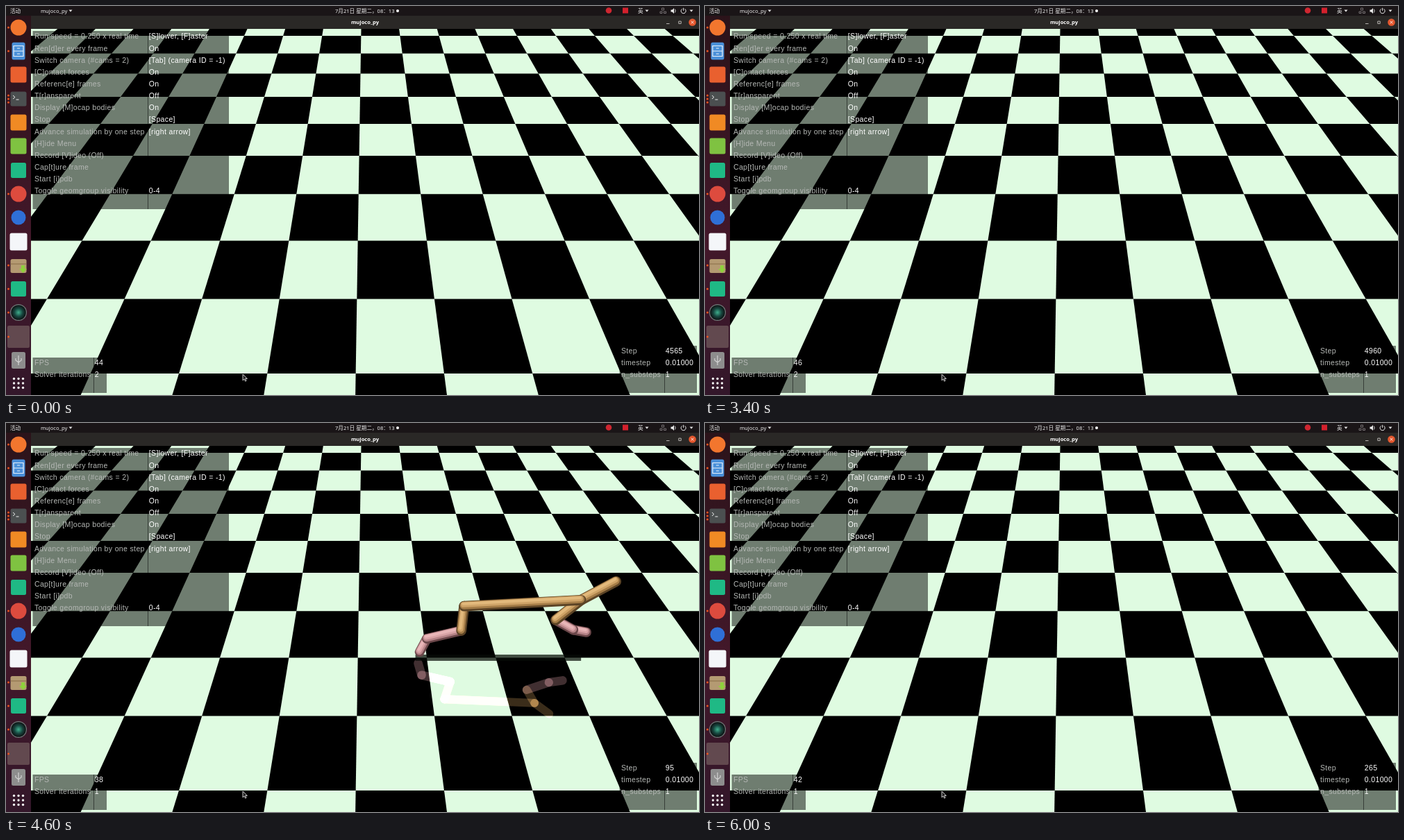
An HTML page with a canvas for the animation above (6070 ms loop, 998 by 561 pixels).

```html
<!DOCTYPE html>
<html lang="zh">
<head>
<meta charset="utf-8">
<title>mujoco_py</title>
<style>
  html, body { margin: 0; width: 100%; height: 100%; overflow: hidden; background: #000; }
  canvas, svg { position: absolute; left: 0; top: 0; width: 998px; height: 561px; }
  .hud { font: 10.5px "Liberation Sans", Arial, sans-serif; letter-spacing: .35px; fill: #fff; }
  .hud .label { fill: #b5b8b5; }
  .bar { font: 7.6px "Noto Sans", "Noto Sans CJK SC", sans-serif; fill: #ececec; }
</style>
</head>
<body>
<canvas id="scene" width="998" height="561"></canvas>
<svg id="ui" viewBox="0 0 998 561">
  <defs>
    <linearGradient id="dock" x2="0" y2="1">
      <stop offset="0" stop-color="#2a1319"/><stop offset=".6" stop-color="#43182a"/><stop offset="1" stop-color="#33172a"/>
    </linearGradient>
    <radialGradient id="lens">
      <stop offset="0" stop-color="#3fae8c"/><stop offset=".55" stop-color="#17463f"/><stop offset="1" stop-color="#0c1212"/>
    </radialGradient>
  </defs>

  <g id="hud" class="hud"></g>

  <path d="M341 531v9l2.1-1.9 1.5 3.1 1.5-.7-1.5-3h2.8z" fill="#222" stroke="#d8d8d8" stroke-width=".9"/>

  <rect width="36" height="561" fill="url(#dock)"/>
  <rect width="998" height="14" fill="#1a1517"/>
  <rect x="36" y="14" width="962" height="19" fill="#2a2826"/>
  <g class="bar">
    <text x="6" y="10">活动</text>
    <text x="50" y="10">mujoco_py</text>
    <text x="474" y="10" textLength="">7月21日 星期二，08：13</text>
    <text x="910" y="10">英</text>
    <text x="517" y="26.3" text-anchor="middle" font-weight="700" fill="#fff">mujoco_py</text>
  </g>
  <path d="M90.500 5.500h5l-2.500 3zM920.500 5.500h5l-2.500 3zM984.500 5.500h5l-2.500 3z" fill="#e4e4e4"/>
  <circle cx="564" cy="7" r="2" fill="#fff"/>
  <circle cx="868" cy="6.500" r="4.300" fill="#cf2630"/>
  <rect x="888" y="2.500" width="8" height="8" fill="#d3202c"/>
  <path d="M944.500 3h3v3h-3zM942 8h3v2.500h-3zM947.500 8h3v2.500h-3z" fill="none" stroke="#8c8688" stroke-width=".8"/>
  <path d="M957.500 5.500h2l2.500-2.500v8l-2.500-2.500h-2z" fill="#eee"/>
  <path d="M963.300 4.500q1.800 2.500 0 5" fill="none" stroke="#ccc"/>
  <path d="M973.700 4.200a3.500 3.500 0 1 0 3.800 0M975.600 2.800v4" fill="none" stroke="#eee"/>
  <path d="M951 25.500h4.500M968.800 22h3.400v3.400h-3.400z" fill="none" stroke="#c9c6c2" stroke-width=".9"/>
  <circle cx="988.500" cy="23.500" r="5.300" fill="#e4572e"/>
  <path d="M986.700 21.700l3.600 3.600m0-3.600l-3.600 3.600" stroke="#fff" stroke-width=".9"/>
  <g id="icons"></g>
</svg>

<script>
const LOOP = 6070, W = 998, H = 561;
const ctx = document.getElementById('scene').getContext('2d');
const hud = document.getElementById('hud');
const icons = document.getElementById('icons');

function add(parent, tag, attrs, text) {
  const el = document.createElementNS('http://www.w3.org/2000/svg', tag);
  for (const k in attrs) el.setAttribute(k, attrs[k]);
  if (text !== undefined) el.textContent = text;
  parent.append(el);
  return el;
}

/* ---- overlay panels ---- */
function panel(x, y, w, h, split, baseline, rows) {
  for (const [px, pw] of [[x, split - x + .5], [split - .5, x + w - split + .5]])
    add(hud, 'rect', { x: px, y, width: pw, height: h, fill: '#000', opacity: .5 });
  return rows.map(([label, value], i) => {
    const ty = baseline + i * 17.15;
    add(hud, 'text', { x: x + 2.5, y: ty, class: 'label' }, label);
    return add(hud, 'text', { x: split + 1.3, y: ty }, value);
  });
}

panel(38.5, 36, 282.5, 257, 204.5, 47.4, [
  ['Run speed = 0.250 x real time', '[S]lower, [F]aster'],
  ['Ren[d]er every frame', 'On'],
  ['Switch camera (#cams = 2)', '[Tab] (camera ID = -1)'],
  ['[C]ontact forces', 'On'],
  ['Referenc[e] frames', 'On'],
  ['T[r]ansparent', 'Off'],
  ['Display [M]ocap bodies', 'On'],
  ['Stop', '[Space]'],
  ['Advance simulation by one step', '[right arrow]'],
  ['[H]ide Menu', ''],
  ['Record [V]ideo (Off)', ''],
  ['Cap[t]ure frame', ''],
  ['Start [i]pdb', ''],
  ['Toggle geomgroup visibility', '0-4']
]);
const [fpsText, solverText] = panel(38.5, 507, 106.5, 51, 126.5, 518,
  [['FPS', ''], ['Solver iterations', '']]);
const [stepText] = panel(883.5, 490, 111.5, 68, 948.5, 500.8,
  [['Step', ''], ['timestep', '0.01000'], ['n_substeps', '1']]);

/* ---- dock ---- */
const disc = (y, fill, r = 11.5) => add(icons, 'circle', { cx: 18, cy: y, r, fill });
const tile = (y, fill, w = 23, h = 23) =>
  add(icons, 'rect', { x: 18 - w / 2, y: y - h / 2, width: w, height: h, rx: 2.5, fill });
const line = (d, stroke, width = 1.2) =>
  add(icons, 'path', { d, stroke, 'stroke-width': width, fill: 'none' });

disc(31, '#f2762e');
tile(65, '#4a90d9', 19, 25);
line('M11 57.500h14v15h-14zM11 65h14M16 61h4M16 69h4', '#e8f1fa');
tile(99, '#e9602f');
tile(134, '#4b4f50', 23, 21);
line('M10 129l3 2.500-3 2.500M14.500 135h4', '#eee', 1);
tile(168, '#f08a24');
tile(202, '#7fc241');
tile(237, '#1fb985', 22, 22);
disc(271, '#dd4b3e');
disc(305, '#2f6fd6', 10.5);
tile(340, '#f4f6f9', 25, 25);
tile(375, '#b49a72', 23, 20);
line('M7 372h22', '#8f764f');
add(icons, 'path', { d: 'M22 374h5v5h3l-5.500 6-5.500-6h3z', fill: '#8fd03c' });
tile(408, '#1fb985', 22, 22);
disc(442, '#747c7c', 12);
disc(442, 'url(#lens)', 10.8);
add(icons, 'rect', { x: 2, y: 461, width: 32, height: 32, rx: 2, fill: '#62494f' });
tile(511, '#8d8d8d', 20, 24);
line('M18 518v-14m-4 4v3l4 3m4-6v3l-4 3', '#d2d2d2');
for (let i = 0; i < 9; i++)
  add(icons, 'circle', { cx: 11.5 + i % 3 * 6.5, cy: 537.5 + (i / 3 | 0) * 6.5, r: 1.7, fill: '#f2f2f2' });
for (const y of [31, 65, 129, 134, 139, 271, 374, 408, 442, 477])
  add(icons, 'circle', { cx: 3.5, cy: y, r: 1.5, fill: '#e95420' });

/* ---- floor: perspective checkerboard ---- */
const HORIZON = -340.8, VANISH = 517.4;
const rowY = n => HORIZON + 6176.6 / (n + 7.093);
const colX = (k, y) => VANISH + (y - HORIZON) * (k * .1462 - .0158);

function drawFloor() {
  ctx.fillStyle = '#000';
  ctx.fillRect(0, 0, W, H);
  ctx.fillStyle = '#dffbe1';
  for (let n = -1; n < 11; n++) {
    const y0 = rowY(n), y1 = rowY(n + 1);
    for (let k = -10; k < 11; k++) {
      if ((k + n) & 1) continue;
      ctx.beginPath();
      ctx.moveTo(colX(k, y0), y0);
      ctx.lineTo(colX(k + 1, y0), y0);
      ctx.lineTo(colX(k + 1, y1), y1);
      ctx.lineTo(colX(k, y1), y1);
      ctx.fill();
    }
  }
}

/* ---- cheetah: planar skeleton above the floor line ---- */
const GROUND = 338.5, CENTER = 515, NADIR = 950;
const project = ([x, u]) => {
  const s = 1 / (1 - u / NADIR);
  return [CENTER + x * s, (GROUND - u) * s, s];
};
const TAN = ['#5c4426', '#a57d48', '#cfa468', '#e2b97c'];
const PINK = ['#6b474a', '#b58387', '#d8a3a6', '#e8b6b8'];

// time, x, height, then angles: torso, back thigh/shin/foot, front thigh/shin/foot
const POSES = [
  [56, -95, 100, 0, -57, 207, -73, -120, -54, -57],
  [60, -78, 74, 3, -78, 168, -112, -111, -39, -18],
  [64.5, 12, 90, -4, -58, 205, -80, -118, -48, -45],
  [69, 129, 103, 4.2, -86, 200, -105, -121, -33, -14],
  [73.5, 310, 88, -3, -60, 190, -85, -112, -45, -30],
  [78, 511, 122, -10, -89, 197, -119, -118, -40, -30],
  [82, 720, 95, -4, -60, 195, -85, -115, -45, -30]
];

// Linear interpolation through rows of [time, ...values].
function track(keys, t) {
  let j = 0;
  while (j < keys.length - 2 && t >= keys[j + 1][0]) j++;
  const a = keys[j], b = keys[j + 1], f = (t - a[0]) / (b[0] - a[0]);
  return a.slice(1).map((v, i) => v + (b[i + 1] - v) * f);
}

function limb([x, u], angle, length) {
  const r = angle * Math.PI / 180;
  return [x + Math.cos(r) * length, u + Math.sin(r) * length];
}

function skeleton(t) {
  const [x, u, torso, bt, bs, bf, ft, fs, ff] = track(POSES, t);
  const back = [x, u], front = limb(back, torso, 147);
  const head = limb(front, torso + 39.5, 45);
  const bKnee = limb(back, bt, 46), bHeel = limb(bKnee, bs, 48), bToe = limb(bHeel, bf, 29);
  const fKnee = limb(front, ft, 42), fHeel = limb(fKnee, fs, 35), fToe = limb(fHeel, ff, 20);
  return [
    [bHeel, bToe, PINK], [bKnee, bHeel, PINK], [fHeel, fToe, PINK], [fKnee, fHeel, PINK],
    [back, bKnee, TAN], [front, fKnee, TAN], [front, head, TAN], [back, front, TAN]
  ];
}

function capsule(a, b, tones, mirrored) {
  const flip = mirrored ? -1 : 1;
  const [x0, y0, s] = project([a[0], a[1] * flip]);
  const [x1, y1] = project([b[0], b[1] * flip]);
  tones.forEach((tone, i) => {
    const shift = i * 1.1;
    ctx.strokeStyle = tone;
    ctx.lineWidth = (13.2 - i * 3.2) * s;
    ctx.beginPath();
    ctx.moveTo(x0 - shift * .4, y0 - shift * flip);
    ctx.lineTo(x1 - shift * .4, y1 - shift * flip);
    ctx.stroke();
  });
}

function drawCheetah(t) {
  const parts = skeleton(t);
  ctx.lineCap = 'round';

  ctx.globalCompositeOperation = 'lighter';
  ctx.globalAlpha = .36;
  for (const [a, b, tones] of parts) capsule(a, b, [tones[1]], true);
  ctx.globalCompositeOperation = 'source-over';

  const xs = parts.flatMap(([a, b]) => [a[0], b[0]]);
  const left = CENTER + Math.min(...xs) - 5, right = CENTER + Math.max(...xs) + 5;
  ctx.globalAlpha = .72;
  ctx.fillStyle = '#080c08';
  ctx.fillRect(left, GROUND - 4.5, right - left, 9);

  ctx.globalAlpha = 1;
  for (const [a, b, tones] of parts) capsule(a, b, tones);
}

/* ---- playback at 15 pictures per second, on a 10 ms clock ---- */
const STEPS = [[0, 4565], [20, 4715], [51, 4960], [56, 5000]];
const RESTART = [[56, 0], [60, 30], [69, 95], [78, 165], [90, 265]];
const FPS = [[0, 44], [20, 45], [51, 46], [60, 40], [69, 38], [78, 39], [90, 42]];

const startOf = i => 10 * Math.round(i * 20 / 3);
function tickAt(ms) {
  let i = Math.floor(ms * 3 / 200) + 1;
  while (startOf(i) > ms) i--;
  return Math.min(i, 90);
}

let shown = -1;
function play() {
  const i = tickAt(performance.now() % LOOP);
  if (i !== shown) {
    shown = i;
    drawFloor();
    if (i >= 56 && i < 83) drawCheetah(i);
    const [step] = track(i < 56 ? STEPS : RESTART, i);
    stepText.textContent = 5 * Math.round(step / 5);
    fpsText.textContent = Math.round(track(FPS, i)[0]);
    solverText.textContent = i % 7 < 3 ? 2 : 1;
  }
  requestAnimationFrame(play);
}
play();
</script>
</body>
</html>
```
